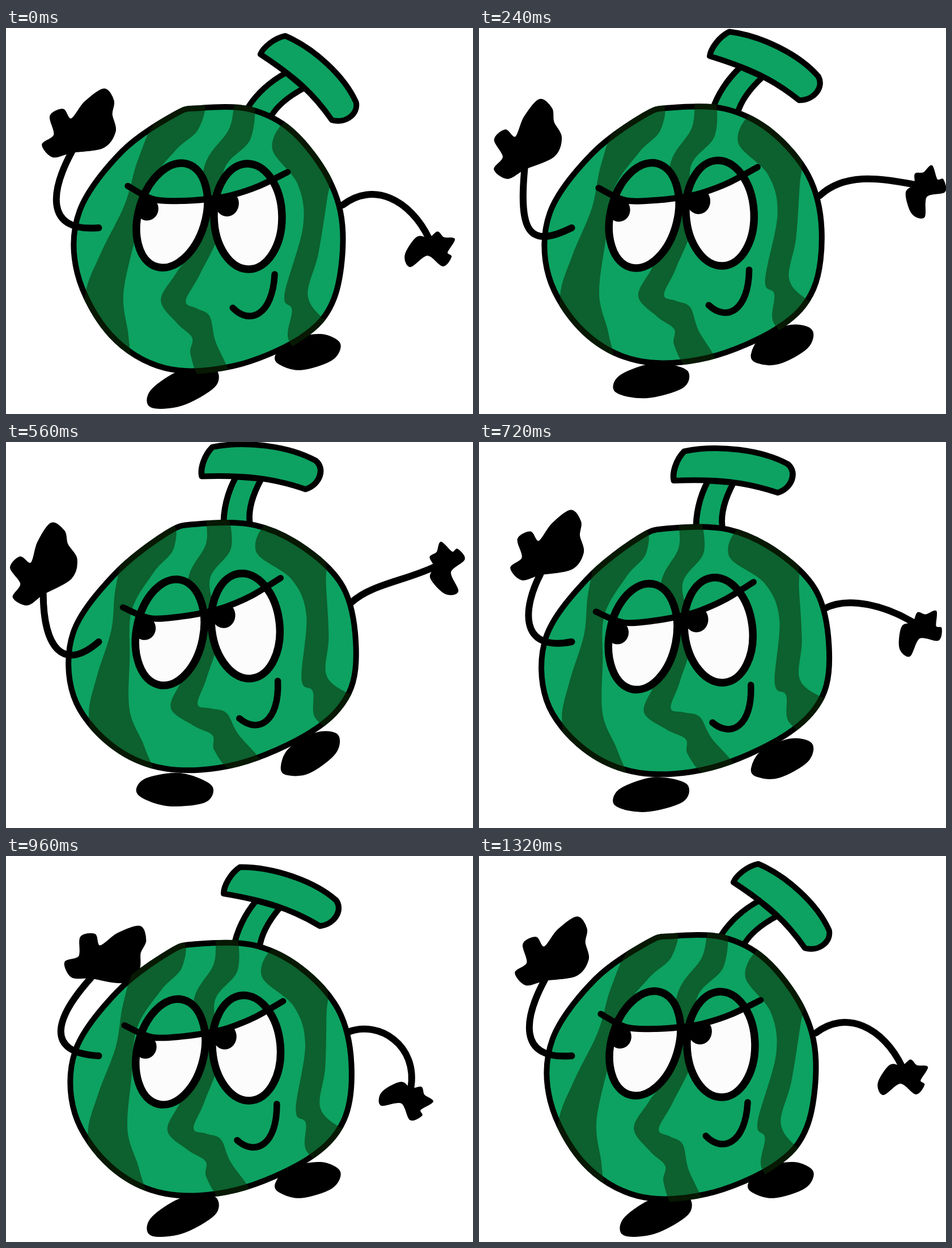
An HTML page that plays this animation: 824x680 px, repeating every 1360 ms.

```html
<!DOCTYPE html>
<html lang="en">
<head>
<meta charset="utf-8">
<title>Dancing melon</title>
<style>
html, body { margin: 0; width: 100%; height: 100%; overflow: hidden; background: #fff; }
svg { display: block; width: 824px; height: 680px; }
.line { fill: none; stroke: #000; stroke-linecap: round; stroke-linejoin: round; }
.skin { fill: #0da261; stroke: #000; stroke-width: 10; stroke-linejoin: round; }
.limb { stroke: #000; stroke-width: 1.5; }
</style>
</head>
<body>
<svg viewBox="0 0 824 680" xmlns="http://www.w3.org/2000/svg">
  <defs>
    <mask id="inBody" maskUnits="userSpaceOnUse" x="0" y="-20" width="824" height="720">
      <path id="bodyMask" fill="#fff" stroke="#fff" stroke-width="10"/>
    </mask>
    <ellipse id="eyeL" cx="293" cy="330" rx="59" ry="94.5" transform="rotate(17 293 330)"/>
    <ellipse id="eyeR" cx="427" cy="332" rx="60" ry="93" transform="rotate(-1 427 332)"/>
    <clipPath id="inEyes"><use href="#eyeL"/><use href="#eyeR"/></clipPath>
  </defs>
  <path id="footL" class="limb"/>
  <path id="footR" class="limb"/>
  <path id="handL" class="limb"/>
  <path id="armR" class="line" stroke-width="12"/>
  <path id="handR" class="limb"/>
  <g id="melon">
    <g id="stem" class="skin">
      <path d="M495,79C468,93 443,115 427,140L440,160L460,168L467,157C478,138 500,120 527,106Z"/>
      <path d="M494,14C545,36 598,86 618,132C622,152 600,170 575,163C543,116 510,86 450,46C455,34 474,18 494,14Z"/>
    </g>
    <path id="body" class="skin"/>
    <g mask="url(#inBody)" fill="#0d2d06" fill-opacity=".55">
      <g id="stripes"><path id="stripeL"/><path id="stripeM"/><path id="stripeR"/></g>
    </g>
    <g id="face">
      <g fill="#fcfcfc"><use href="#eyeL"/><use href="#eyeR"/></g>
      <g clip-path="url(#inEyes)">
        <ellipse cx="249" cy="318" rx="20" ry="21"/>
        <ellipse cx="390" cy="309" rx="21" ry="23"/>
        <path id="lid" fill="#0da261"/>
      </g>
      <g class="line" stroke-width="13.5"><use href="#eyeL"/><use href="#eyeR"/></g>
      <path id="brow" class="line" stroke-width="11"/>
      <path class="line" stroke-width="11.5" d="M400,493C430,524 470,506 474,434"/>
    </g>
  </g>
  <path id="armL" class="line" stroke-width="12"/>
</svg>
<script>
const LOOP = 1360, STEP = 40, CYCLE = 1320;
const { sin, cos, tanh, PI } = Math;

const nums = s => s.match(/-?[\d.]+/g).map(Number);
const set = (id, attrs) => {
  const el = document.getElementById(id);
  for (const k in attrs) el.setAttribute(k, attrs[k]);
};

// Smooth curve through x,y pairs
function curve(p, closed) {
  const n = p.length / 2;
  const at = i => {
    i = closed ? (i + n) % n : Math.max(0, Math.min(n - 1, i));
    return [p[2 * i], p[2 * i + 1]];
  };
  let d = `M${at(0)}`;
  for (let i = 0; i < (closed ? n : n - 1); i++) {
    const [a, b, c, e] = [at(i - 1), at(i), at(i + 1), at(i + 2)];
    const c1 = b.map((x, k) => x + (c[k] - a[k]) / 6);
    const c2 = c.map((x, k) => x - (e[k] - b[k]) / 6);
    d += `C${c1} ${c2} ${c}`;
  }
  return d + (closed ? 'Z' : '');
}

// Melon outline, leaning and upright
const leaning = nums('340,141 430,143 505,182 570,268 594,360 578,478 520,546 400,596 280,599 185,541 126,432 130,322 205,217 298,152');
const upright = nums('335,153 440,155 530,197 596,264 618,360 606,449 540,517 410,574 283,583 185,541 119,456 118,345 190,243 283,169');

const blobs = {
  stripeL: '270,160 234,230 210,310 168,395 140,468 140,560 214,600 216,545 207,470 228,370 250,280 300,215 340,178 347,130',
  stripeM: '408,120 394,178 350,245 340,370 300,432 273,480 302,521 328,546 325,575 345,620 395,620 369,552 359,508 336,494 317,481 342,434 380,350 385,250 432,195 438,120',
  stripeR: '500,160 470,212 515,276 524,350 491,470 504,497 498,550 540,590 590,530 557,511 532,470 551,398 567,300 575,250 560,170',
  footL: '340,598 300,607 255,640 256,668 310,665 368,632 371,603',
  footR: '476,576 482,592 520,602 575,585 589,556 555,540 500,550',
  handL: '115,219 82,227 63,205 84,188 77,155 100,143 114,160 138,130 172,107 189,128 186,152 192,182 170,211',
  handR: '746,371 725,369 704,400 713,421 743,401 770,420 785,404 778,396 791,373 772,370 761,360'
};
for (const id in blobs) set(id, { d: curve(nums(blobs[id]), true) });

const browLine = curve(nums('215,278 262,302 320,304 368,300 400,294 445,279 497,254'));
set('brow', { d: browLine });
set('lid', { d: browLine + 'L530,150L180,150Z' });

// Move the point px,py of a part to x,y and turn the part about it
const place = (id, px, py, x, y, turn) =>
  set(id, { transform: `translate(${x} ${y}) rotate(${turn}) translate(${-px} ${-py})` });
const arm = (id, ...p) => set(id, { d: `M${p.slice(0, 2)}C${p.slice(2)}` });

function draw(ms) {
  const t = Math.floor(ms % LOOP / STEP) * STEP % CYCLE;
  const phase = 2 * PI * t / CYCLE;
  const s = sin(PI * (t + 10) / CYCLE);
  const u = (s + s * s) / 2; // 0 leaning, 1 upright
  const q = .18 - .23 * cos(phase) + .9 * sin(phase)
    + .05 * cos(2 * phase) - .2 * sin(2 * phase); // arm swing
  const q2 = q * q, arc = 4 * u * (1 - u);

  const step = .52 * u + .42 * q;
  place('footL', 312, 636, 312 - 16 * step, 636 - 23 * step, 27 * step);
  place('footR', 533, 572, 533 + 5 * step, 572 - 24 * step, -22 * step);

  const lx = 116 - 47 * q - 4 * u, ly = 218 + 25 * q + 13 * u + 12 * q2;
  place('handL', 115, 218, lx, ly, -21 * q);
  arm('armL', 163.5, 352,
    66 + 18 * q + 18 * q2, 360 + 30 * q + 8 * u + 8 * q2,
    80 - 14 * q, 322 + 42 * tanh(4 * (q - .35)), lx, ly);

  const reach = 176.5 + 14 * q + 6 * u, aim = (32.7 - 39 * q - 18 * u) * PI / 180;
  const hx = 600 + reach * cos(aim), hy = 300 + reach * sin(aim);
  const turn = -55 * q - 24 * u, a = turn * PI / 180;
  place('handR', 748.5, 395.5, hx, hy, turn);
  arm('armR', 594 + 16 * u, 312 - 12 * q - 18 * u,
    648 - 9 * q + 4 * u, 270 - 22 * q + 3 * u,
    713 - 15 * q + 5 * u, 302 - 48 * q - 10 * u,
    hx + 24 * sin(a) - 2.5 * cos(a), hy - 24 * cos(a) - 2.5 * sin(a));

  set('melon', { transform: `translate(0 ${-8 * q})` });
  set('stem', { transform: `translate(${447 - 43 * u + 5 * arc} ${147 + 5 * u + 4 * arc}) scale(${1 + .08 * u} 1) rotate(${-36.7 * u}) translate(-447 -147)` });
  const d = curve(leaning.map((x, i) => x + (upright[i] - x) * u), true);
  set('body', { d });
  set('bodyMask', { d });
  set('stripes', { transform: `matrix(${[1 + .07 * u, -.2 * u, .23 * u, 1 - .12 * u, -111 * u, 109 * u]})` });
  set('face', { transform: `translate(0 ${7 * u}) rotate(${-5.9 * u} 357 372)` });
}

const start = performance.now();
function tick() {
  draw(performance.now() - start);
  requestAnimationFrame(tick);
}
tick();
</script>
</body>
</html>
```
